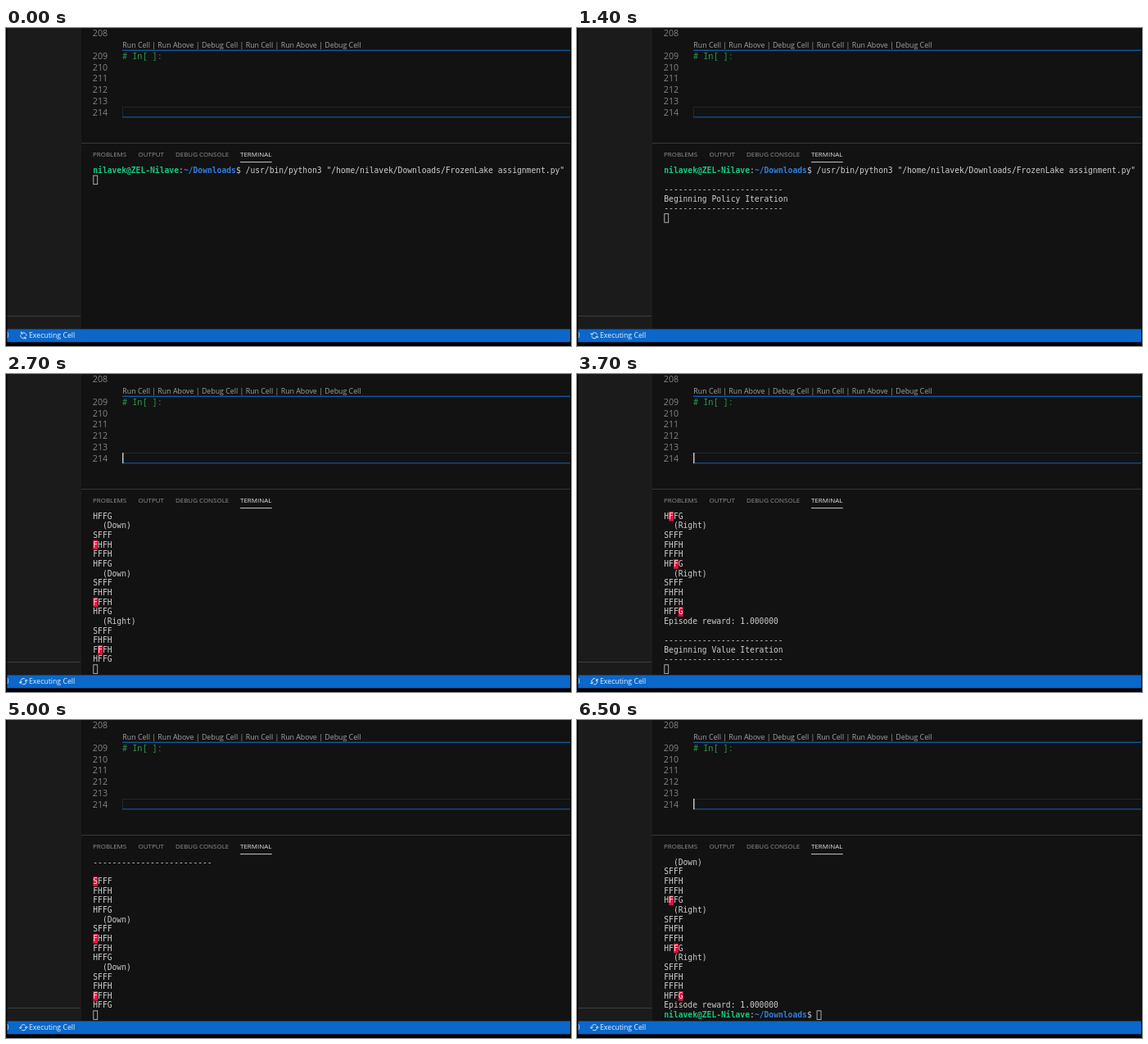
An HTML page for the animation above (6.6 s loop, 690x388 px).

```html
<!DOCTYPE html>
<html lang="en">
<head>
<meta charset="utf-8">
<title>Terminal run</title>
<style>
  html, body { margin: 0; width: 100%; height: 100%; overflow: hidden; background: #000; }
  svg { display: block; width: 100vw; height: 100vh; }
  text { white-space: pre; }
  .ui { font-family: "Open Sans", "Noto Sans", sans-serif; }
  .code { font: 10.2px "Noto Sans Mono", "DejaVu Sans Mono", monospace; }
  .term { font: 9.67px "DejaVu Sans Mono", monospace; fill: #cecece; }
  .user { fill: #12cb83; font-weight: bold; }
  .path { fill: #2f7fe2; font-weight: bold; }
  .hot { fill: #ffd9df; }
</style>
</head>
<body>
<svg id="stage" viewBox="0 0 690 388">
  <rect width="690" height="388" fill="#121212"/>
  <rect width="92" height="367" fill="#1b1b1b"/>
  <rect y="351" width="91" height="1" fill="#3e3e3e"/>

  <g id="numbers" class="ui" font-size="10.7" fill="#858585"></g>
  <text class="ui" x="142.3" y="24" font-size="8.83" fill="#a2a2a2">Run Cell | Run Above | Debug Cell | Run Cell | Run Above | Debug Cell</text>
  <rect x="142" y="26.7" width="548" height="1.2" fill="#1261ac"/>
  <text class="code" x="142" y="37.8" fill="#2f9a4e"># In[ ]:</text>
  <path d="M690 96.5H142.5V108" fill="none" stroke="#272727"/>
  <rect x="142" y="108.2" width="548" height="1.1" fill="#125ba2"/>
  <rect id="caret" x="142" y="96" width="1.5" height="13" fill="#c4c4c4"/>

  <rect x="92" y="140" width="598" height="1" fill="#383838"/>
  <g class="ui" font-size="7.96" fill="#929292">
    <text x="106" y="156.6">PROBLEMS</text>
    <text x="161.5" y="156.6">OUTPUT</text>
    <text x="207" y="156.6">DEBUG CONSOLE</text>
    <text x="286" y="156.6" fill="#e4e4e4">TERMINAL</text>
  </g>
  <rect x="286" y="163.1" width="38.8" height="1" fill="#cacaca"/>
  <g id="term"></g>

  <rect y="367.4" width="690" height="16.1" fill="#0b67c9"/>
  <rect y="383.5" width="690" height="4.5" fill="#000"/>
  <g class="ui" font-size="8.74" fill="#e8f1fb">
    <text x="-1.4" y="378.2">0</text>
    <text x="28" y="378.2">Executing Cell</text>
  </g>
  <g id="spinner" fill="none" stroke="#d8e8fa" stroke-width="0.9">
    <path id="arc" d="M-3.6 -0.5A3.7 3.7 0 0 1 3 -2.1M-5.2 -1.5L-3.6 0.5L-1.8 -1.2"/>
    <use href="#arc" transform="rotate(180)"/>
  </g>
  <path d="M0 0H1.4V388H0ZM689 0H690V388H689Z" fill="#050505"/>
</svg>
<script>
const LOOP = 6600, ROWS = 17;
const LEFT = 106.3, TOP = 173.6, CHAR = 5.822, ROW = 11.65;
const $ = id => document.getElementById(id);

function el(parent, name, attrs, content) {
  const node = document.createElementNS("http://www.w3.org/2000/svg", name);
  for (const key in attrs) node.setAttribute(key, attrs[key]);
  if (content !== undefined) node.textContent = content;
  return parent.appendChild(node);
}

// The row of cell actions leaves a gap after line 208.
for (let n = 208; n <= 214; n++)
  el($("numbers"), "text", { x: 105.8, y: n === 208 ? 10 : 37.8 + (n - 209) * 13.8 }, n);

// A line is a time and a list of [text, class] parts.
const log = [];
const add = (at, ...parts) => log.push({ at, parts });
const prompt = [["nilavek@ZEL-Nilave", "user"], [":", ""], ["~/Downloads", "path"]];

function banner(at, name) {
  const rule = "-".repeat(25);
  add(at);
  for (const s of [rule, `Beginning ${name} Iteration`, rule]) add(at, [s, ""]);
}

function grid(at, row, col) {
  ["SFFF", "FHFH", "FFFH", "HFFG"].forEach((s, r) => {
    if (r !== row) add(at, [s, ""]);
    else add(at, [s.slice(0, col), ""], [s[col], "hot"], [s.slice(col + 1), ""]);
  });
}

function episode(start) {
  let at = start, row = 0, col = 0;
  add(at);
  grid(at, row, col);
  for (const move of ["Down", "Down", "Right", "Down", "Right", "Right"]) {
    at += 250;
    if (move === "Down") row++; else col++;
    add(at, [`  (${move})`, ""]);
    grid(at, row, col);
  }
  add(at, ["Episode reward: 1.000000", ""]);
  return at;
}

add(0, ...prompt, ['$ /usr/bin/python3 "/home/nilavek/Downloads/FrozenLake assignment.py"', ""]);
banner(1000, "Policy");
banner(episode(1800), "Value");
add(episode(4500) + 100, ...prompt, ["$ ", ""]);

function drawLine(line, row) {
  const y = TOP + row * ROW;
  let col = 0;
  for (const [text, cls] of line.parts) {
    const x = LEFT + col * CHAR;
    if (cls === "hot")
      el($("term"), "rect", { x, y: y - 5.8, width: CHAR, height: ROW, fill: "#e3113f" });
    if (text) el($("term"), "text", { x, y: y + 3.1, class: "term " + cls }, text);
    col += text.length;
  }
  return col;
}

let shown = -1;
function drawTerm(t) {
  const count = log.filter(line => line.at <= t).length;
  if (count === shown) return;
  shown = count;
  $("term").replaceChildren();
  const atPrompt = count === log.length;
  const cursorLine = atPrompt ? count - 1 : count;
  const top = Math.max(0, cursorLine - ROWS + 1);
  let end = 0;
  for (let i = top; i < count; i++) end = drawLine(log[i], i - top);
  el($("term"), "rect", {
    x: LEFT + (atPrompt ? end : 0) * CHAR + 0.5,
    y: TOP + (cursorLine - top) * ROW - 5.2,
    width: 4.9, height: 10.6, fill: "none", stroke: "#bdbdbd", "stroke-width": 0.9
  });
}

// The screen stalls while the solver is busy.
function held(t) {
  if (t >= 1400 && t < 1800) return 1390;
  if (t >= 3400 && t < 4500) return 3400;
  return t;
}

function render(t) {
  const s = held(t), phase = s % 1000;
  $("caret").setAttribute("visibility", phase >= 400 && phase < 900 ? "visible" : "hidden");
  $("spinner").setAttribute("transform", `translate(21.3 375.2) rotate(${45 + s * 0.24})`);
  drawTerm(t);
}

function tick() {
  const t = performance.now() % LOOP;
  render(Math.floor(t / 100) * 100);
  requestAnimationFrame(tick);
}
tick();
</script>
</body>
</html>
```
